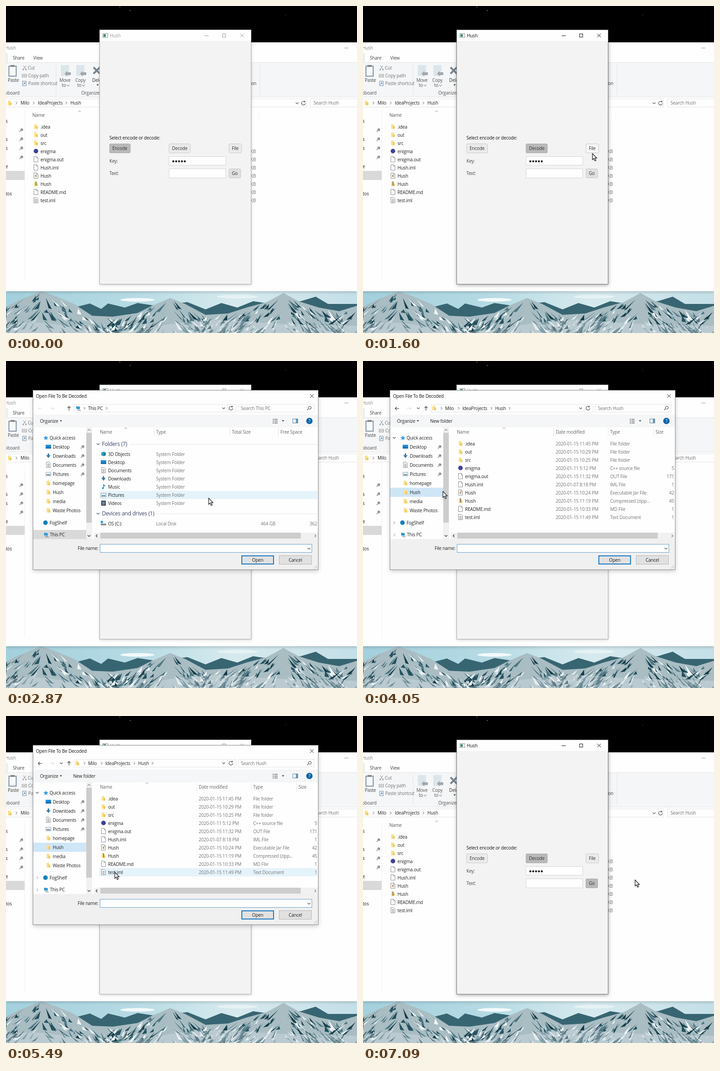
An HTML page for the animation above (7.17 s loop, 774x720 px).

```html
<!DOCTYPE html>
<html lang="en">
<head>
<meta charset="utf-8">
<title>File picker demo</title>
<style>
html, body { margin: 0; width: 100%; height: 100%; overflow: hidden; background: #000; }
svg { display: block; width: 774px; height: 720px; }
text { font: 10px "Open Sans", "Noto Sans", sans-serif; letter-spacing: -.02em; white-space: pre; }
text.big { font-size: 12px; }
.line { fill: none; }
.shade { filter: drop-shadow(0 2px 3px #0003); }
.glow { filter: drop-shadow(0 3px 5px #0003); }
#cursor { animation: move 7170ms linear infinite; }
</style>
</head>
<body>
<svg id="stage" viewBox="0 0 774 720"></svg>
<script>
const LOOP = 7170;
const WHITE = '#fefefe', PANEL = '#f3f3f3', INK = '#222', GREY = '#747474',
      EDGE = '#e4e4e4', THUMB = '#cdcdcd', BLUE = '#1e90d2';

// Drawing helpers
const text = (x, y, s, fill = INK, more = '') => `<text x="${x}" y="${y}" fill="${fill}" ${more}>${s}</text>`;
const end = (x, y, s, fill = GREY) => text(x, y, s, fill, 'text-anchor="end"');
const mid = (x, y, s, fill = INK) => text(x, y, s, fill, 'text-anchor="middle"');
const rect = (x, y, w, h, fill, more = '') => `<rect x="${x}" y="${y}" width="${w}" height="${h}" fill="${fill}" ${more}/>`;
const box = (x, y, w, h, fill, stroke, more = '') => rect(x + .5, y + .5, w - 1, h - 1, fill, `stroke="${stroke}" ${more}`);
const line = (d, stroke = GREY, w = 1) => `<path class="line" d="${d}" stroke="${stroke}" stroke-width="${w}"/>`;
const shape = (d, fill, more = '') => `<path d="${d}" fill="${fill}" ${more}/>`;
const dot = (x, y, r, fill) => `<circle cx="${x}" cy="${y}" r="${r}" fill="${fill}"/>`;
const group = (id, ...parts) => `<g id="${id}">${parts.join('')}</g>`;
const chevron = {
  right: (x, y, c = '#555') => line(`M${x - 1.5} ${y - 3}l3 3-3 3`, c),
  left: (x, y, c = '#333') => line(`M${x + 1.5} ${y - 3}l-3 3 3 3`, c, 1.3),
  down: (x, y, c = '#555') => line(`M${x - 3} ${y - 1.5}l3 3 3-3`, c, 1.2),
  up: (x, y, c = '#888') => line(`M${x - 3} ${y + 1.5}l3-3 3 3`, c)
};
const caret = (x, y) => shape(`M${x - 2.5} ${y - 1.5}h5l-2.5 3z`, '#333');
const pin = (x, y) => line(`M${x - 4} ${y + 4}l3-3m-1.5-2.5l4 4m-2.5-5.5l4.5 4.5`, '#77808a', 1.2)
  + shape(`M${x - 1} ${y - 2}l2-2 3 3-2 2z`, '#77808a');
const cross = (x, y, r = 4, c = INK, w = 1) => line(`M${x - r} ${y - r}l${2 * r} ${2 * r}m0 ${-2 * r}l${-2 * r} ${2 * r}`, c, w);
const refresh = (x, y) => line(`M${x + 3} ${y - 3}a4.2 4.2 0 1 0 1.2 3m-1-5.5v2.8h-2.8`, '#555', 1.2);

const page = (x, y, rows = 0) => shape(`M${x - 4.5} ${y - 6}h6l3 3v9h-9z`, '#fdfdfd', 'stroke="#8f8f8f"')
  + (rows ? line(`M${x - 2.5} ${y - 2}h5m-5 2h5m-5 2h5m-5 2h5`, '#8b959a') : line(`M${x + 1.5} ${y - 6}v3h3`, '#8f8f8f'));
const icons = {
  folder: (x, y) => rect(x - 4, y - 5, 6, 10, '#fbe08b') + rect(x, y - 1, 4, 6, '#efc95a'),
  page: (x, y) => page(x, y),
  lines: (x, y) => page(x, y, 4),
  code: (x, y) => dot(x, y, 5, '#3d4298'),
  jar: (x, y) => page(x, y) + rect(x - 2, y - 2, 4, 5, '#c4a27c'),
  zip: (x, y) => icons.folder(x, y) + line(`M${x} ${y - 5}v9`, '#7c7458', 2),
  star: (x, y) => shape(`M${x} ${y - 5}l1.5 3.5 4 .3-3 2.5 1 4-3.500-2.200-3.500 2.200 1-4-3-2.500 4-.3z`, '#3999dc'),
  screen: (x, y) => rect(x - 6, y - 4, 12, 8, '#1789d0') + rect(x - 6, y + 2, 12, 2, '#125a90'),
  down: (x, y) => shape(`M${x - 1.5} ${y - 5}h3v4h3.5l-5 6-5-6h3.5z`, '#3578a8'),
  photo: (x, y) => box(x - 6, y - 4, 12, 9, '#e9f3f8', '#9aa0a4') + rect(x - 4, y + 1, 8, 2, '#447f98'),
  cube: (x, y) => shape(`M${x - 5} ${y - 3}l5-2 5 2v6l-5 2-5-2z`, '#22a7bc') + shape(`M${x} ${y - 1}l5-2v6l-5 2z`, '#17778f'),
  note: (x, y) => line(`M${x} ${y + 3}v-8q1 3 4 4`, BLUE, 1.6) + dot(x - 1.5, y + 3.5, 2, BLUE),
  film: (x, y) => rect(x - 5, y - 5, 10, 11, '#3c4044') + rect(x - 3, y - 3, 6, 7, '#6a86a0'),
  cloud: (x, y) => dot(x, y, 5, '#117fc0'),
  pc: (x, y) => shape(`M${x - 5} ${y - 4}l8 1v6l-8-1z`, '#3199d0') + line(`M${x - 3} ${y + 4.5}l8 1`, '#555'),
  disk: (x, y) => rect(x - 6, y + 1, 12, 4, '#8f9296') + rect(x - 6, y - 5, 5, 5, '#2aa0d8')
};

const FILES = [
  ['folder', '.idea', '15 11:45', 'File folder'],
  ['folder', 'out', '15 10:29', 'File folder'],
  ['folder', 'src', '15 10:25', 'File folder'],
  ['code', 'enigma', '11 5:12', 'C++ source file', 5],
  ['page', 'enigma.out', '15 11:32', 'OUT File', 171],
  ['page', 'Hush.iml', '07 8:18', 'IML File', 1],
  ['jar', 'Hush', '15 10:24', 'Executable Jar File', 42],
  ['zip', 'Hush', '15 11:19', 'Compressed (zipp...', 45],
  ['page', 'README.md', '15 10:33', 'MD File', 1],
  ['lines', 'test.iml', '15 11:49', 'Text Document', 1]
];

function wallpaper() {
  const ridge = [[0, 662], [28, 648], [78, 628], [112, 640], [150, 656], [190, 682], [235, 684], [290, 676], [322, 660],
    [362, 643], [395, 656], [440, 680], [490, 677], [530, 664], [575, 652], [612, 632], [645, 650], [690, 664], [735, 672], [774, 660]];
  const far = [[150, 664], [185, 655], [210, 667], [225, 655], [262, 664], [290, 654], [330, 660], [400, 652], [440, 668],
    [475, 654], [510, 664], [545, 650], [585, 656], [650, 650], [683, 640], [710, 656], [774, 656]];
  const area = pts => 'M' + pts.map(p => p.join(' ')).join('L') + 'V720H' + pts[0][0] + 'z';
  const tones = ['#173c49', '#24525f', '#4d7783', '#a5bcc3', '#f0f4f5'];
  let seed = 7;
  const rnd = () => (seed = seed * 16807 % 2147483647) / 2147483647;
  let s = rect(0, 628, 774, 92, 'url(#sky)')
    + '<ellipse cx="290" cy="647" rx="38" ry="4" fill="#f3f9fa"/><ellipse cx="510" cy="640" rx="45" ry="4" fill="#e6f2f5"/>'
    + shape(area(far), '#386572') + shape(area(ridge), '#a9bdc3');
  for (let i = 0; i < 520; i++) {
    const x = rnd() * 774;
    const k = Math.max(1, ridge.findIndex(p => p[0] >= x));
    const [a, b] = [ridge[k - 1], ridge[k]];
    const top = a[1] + (b[1] - a[1]) * (x - a[0]) / (b[0] - a[0]);
    const y = top + 1 + rnd() * (714 - top);
    const side = b[1] > a[1] ? 1 : -1;
    const len = 7 + rnd() * 18, run = side * len * (.5 + rnd()), w = 4 + rnd() * 7;
    s += shape(`M${x.toFixed(1)} ${y.toFixed(1)}l${run.toFixed(1)} ${len.toFixed(1)}l${(-side * w).toFixed(1)} -2z`, tones[i % 5]);
  }
  return s + shape('M0 700Q70 690 150 708T330 706T520 694T774 704V720H0z', '#d5e0e360');
}

function explorer() {
  let s = rect(0, 80, 774, 548, WHITE, 'class="shade"')
    + text(-2, 96, 'Hush', '#8a8a8a') + line('M746 92.5h9', '#999')
    + rect(0, 104, 4, 20, '#e9eef3') + text(15, 118, 'Share', '#444') + text(60, 118, 'View', '#444')
    + rect(0, 124, 774, 76, '#f5f6f7') + line('M0 124.5H774M0 200.5H774M110.5 128V196M559.5 128V196', EDGE);
  s += box(6, 132, 17, 23, '#f6f9fb', '#7c8f9f', 'stroke-width="2"') + rect(10, 130, 9, 4, '#858585') + text(4, 167, 'Paste', '#444')
    + line('M38 131l6 8m0-8l-6 8', '#8a9298') + dot(38, 140, 1.7, '#a0a8aa') + dot(44, 140, 1.7, '#a0a8aa') + text(48, 139.5, 'Cut', GREY)
    + box(35, 150, 11, 7, '#eef0f2', '#999') + line('M37 153.5h7', '#888') + text(49, 157, 'Copy path', GREY)
    + box(36, 165, 9, 11, '#eef3f8', '#7b91a8') + line('M38 173l4-4m-3 0h3v3', '#4675a0') + text(49, 174, 'Paste shortcut', GREY);
  for (const [x, name] of [[121, 'Move'], [155, 'Copy']])
    s += rect(x, 130, 18, 24, '#dbe6ea') + shape(`M${x + 8} 149l6-6v3h8v6h-8v3z`, '#a2a8ae')
      + mid(x + 9, 167, name, '#555') + text(x + 2, 178, 'to', '#555') + chevron.down(x + 16, 175, '#999');
  s += cross(200, 142, 7, '#77838e', 4) + text(190, 167, 'Delete', '#333') + caret(202, 174)
    + end(30, 195, 'Clipboard', '#555') + text(166, 195, 'Organize', '#555') + end(552, 174, 'Invert selection', '#444');
  s += box(-2, 204, 665, 19, WHITE, EDGE) + box(671, 204, 110, 19, WHITE, EDGE) + icons.folder(8, 213.5)
    + chevron.right(23, 213.5) + text(32, 217, 'Milo') + chevron.right(61, 213.5) + text(70, 217, 'IdeaProjects')
    + chevron.right(133, 213.5) + text(142, 217, 'Hush') + chevron.down(642, 214) + refresh(656, 214) + text(678, 217, 'Search Hush', GREY);
  s += text(58, 244, 'Name', '#555') + chevron.up(162, 232) + line('M41.5 230V608M557.5 234V250', '#f0f0f0')
    + rect(0, 363, 41, 20, '#d9d9d9');
  for (const [y, t] of [[257, 's'], [297, 's'], [317, 's'], [357, 'e'], [417, 'tos']]) s += text(-1, y, t);
  for (let y = 273; y < 340; y += 20) s += pin(34, y);
  FILES.forEach(([icon, name, , , size], i) => {
    const y = 266 + 18 * i;
    s += icons[icon](66, y - .5) + text(76, y + 3.5, name) + (size ? end(551, y + 3.5, 'KB') : '');
  });
  return s;
}

const button = (x, y, w, label, fill = '#ebebeb', edge = '#c9c9c9') =>
  box(x, y, w, 21, fill, edge, 'rx="2"') + mid(x + w / 2, y + 14, label, '#333');
const DOWN = ['#b9b9b9', '#adadad'];

function hush() {
  const frame = c => text(229, 69, 'Hush', c) + line('M438 65.5h9', c) + box(477, 61, 8, 8, 'none', c) + cross(520.5, 65, 4, c);
  let s = rect(207, 53, 334, 559, PANEL, 'class="shade"')
    + group('active', rect(207, 53, 334, 559, PANEL, 'class="glow"'))
    + rect(207, 53, 334, 24, WHITE) + box(206, 52, 335, 561, 'none', '#aaa')
    + box(213, 60, 12, 10, '#f4f4f4', '#999') + rect(215, 62, 5, 6, '#3c8f6c') + frame('#999')
    + group('activeTitle', rect(228, 56, 310, 18, WHITE), frame('#111'), box(206, 52, 335, 561, 'none', '#777'))
    + text(228, 294, 'Select encode or decode:', '#111') + text(228, 345, 'Key:', '#444') + text(228, 372, 'Text:', '#444')
    + box(359, 331, 126, 20, WHITE, '#d5d5d5') + box(359, 358, 126, 21, WHITE, '#d5d5d5');
  for (let i = 0; i < 5; i++) s += dot(369 + i * 6.3, 342, 2.3, '#222');
  return s + button(228, 303, 47, 'Encode') + button(359, 303, 48, 'Decode') + button(491, 303, 29, 'File') + button(491, 358, 27, 'Go', '#e0e0e0')
    + group('encodeDown', button(228, 303, 46, 'Encode', ...DOWN))
    + group('decodeDown', button(359, 303, 48, 'Decode', ...DOWN))
    + group('fileHover', button(491, 303, 29, 'File', '#f6f6f6'))
    + group('fileDown', button(491, 303, 29, 'File', ...DOWN))
    + group('goDown', button(491, 358, 27, 'Go', ...DOWN));
}

const hover = (id, y) => group(id, rect(206, y, 481, 18, '#e5f3fb'));

function drives() {
  const head = [['Name', 207], ['Type', 331], ['Total Size', 498], ['Free Space', 605]];
  const rows = [['cube', '3D Objects'], ['screen', 'Desktop'], ['lines', 'Documents'], ['down', 'Downloads'],
    ['note', 'Music'], ['photo', 'Pictures'], ['film', 'Videos']];
  let s = hover('overPictures', 286) + hover('overVideos', 304) + chevron.up(264, 148)
    + line('M326.5 147V166M493.5 147V166M600.5 147V166M273 183.5H686M332 336.5H686', EDGE);
  for (const [t, x] of head) s += text(x, 160, t, '#666');
  for (const [y, t] of [[183, 'Folders (7)'], [336, 'Devices and drives (1)']])
    s += chevron.down(203, y) + text(211.5, y + 4, t, '#3b4465', 'class="big"');
  rows.forEach(([icon, name], i) => {
    const y = 205 + 18 * i;
    s += icons[icon](215, y - .5) + text(225, y + 3.5, name) + text(331, y + 3.5, 'System Folder', GREY);
  });
  return group('drives', s, icons.disk(215, 357), text(225, 361.5, 'OS (C:)'), text(331, 361.5, 'Local Disk', GREY),
    end(594, 361.5, '464 GB'), end(686, 361.5, '362'),
    rect(60, 372, 117, 20, '#d9d9d9'), icons.pc(89, 382), text(97, 386, 'This PC'),
    icons.pc(160, 103.5), chevron.right(173, 104), text(181, 107.5, 'This PC'), chevron.right(222, 104),
    line('M79 104.5h-8m3-3l-3 3 3 3', '#ddd'));
}

function folder() {
  let s = hover('overJar', 281) + hover('overZip', 299) + hover('overReadme', 317) + hover('overTest', 335)
    + chevron.up(311, 148) + line('M420.5 147V166M540.5 147V166M640.5 147V166', EDGE);
  for (const [t, x] of [['Name', 207], ['Date modified', 425], ['Type', 545], ['Size', 645]]) s += text(x, 160, t, '#666');
  FILES.forEach(([icon, name, date, type, size = ''], i) => {
    const y = 182 + 18 * i;
    s += icons[icon](215, y - .5) + text(225, y + 3.5, name) + text(425, y + 3.5, `2020-01-${date} PM`, GREY)
      + text(545, y + 3.5, type, GREY) + end(686, y + 3.5, size);
  });
  return group('folder', s, icons.folder(157, 103.5), chevron.right(173, 104), text(181, 107.5, 'Milo'), chevron.right(211, 104),
    text(219, 107.5, 'IdeaProjects'), chevron.right(283, 104), text(291.5, 107.5, 'Hush'), chevron.right(323, 104),
    text(148, 136, 'New folder'), line('M80 104.5h-9m3.5-3.5l-3.5 3.5 3.5 3.5', '#444', 1.2), chevron.down(122, 104),
    icons.pc(89, 382), text(97, 386, 'This PC'));
}

function sidebar() {
  const items = [['screen', 'Desktop'], ['down', 'Downloads'], ['lines', 'Documents'], ['photo', 'Pictures'],
    ['folder', 'homepage'], ['folder', 'Hush'], ['folder', 'media'], ['folder', 'Waste Photos']];
  let s = group('sideHover', rect(60, 279, 117, 20, '#cfe6f7'), chevron.down(69, 169), chevron.right(69, 356, '#888'), chevron.right(69, 383, '#888'))
    + icons.star(88, 169) + text(96, 172.5, 'Quick access') + icons.cloud(87, 356) + text(96, 359.5, 'FogShelf');
  items.forEach(([icon, name], i) => {
    const y = 189 + 20 * i;
    s += icons[icon](93.5, y - .5) + text(103, y + 3.5, name) + (i < 4 ? pin(169, y) : '');
  });
  return s + rect(177, 146, 13, 246, '#f1f1f1') + rect(177, 158, 12, 198, THUMB)
    + chevron.up(183, 152, '#333') + chevron.down(183, 385, '#333');
}

function dialog() {
  return group('dialog',
    rect(60, 65, 629, 395, PANEL, 'class="glow"'), rect(60, 65, 629, 53, WHITE), rect(60, 118, 629, 28, '#f5f6f7'),
    rect(60, 146, 629, 246, WHITE), text(66, 81, 'Open File To Be Decoded', '#111'), cross(674.5, 77, 4),
    line('M97 104.5h9m-3.5-3.5l3.5 3.5-3.5 3.5', '#d8d8d8'), line('M139 109v-9m-3.5 3.5l3.5-3.5 3.5 3.5', '#444', 1.2),
    box(150, 95, 358, 18, WHITE, EDGE), line('M488.5 95V113', EDGE), chevron.down(480, 104), refresh(496, 104),
    box(512, 95, 168, 18, WHITE, EDGE),
    line('M664 108l3.5-3.5a3 3 0 1 1 1 1', '#555', 1.2),
    text(75, 136, 'Organize'), caret(121, 132),
    line('M588 128.5h3m1 0h7M588 132.5h3m1 0h7M588 136.5h3m1 0h7', '#888', 2), caret(611, 132),
    box(632, 127, 12, 10, '#f8fbfd', '#66798f'), rect(639, 128, 4, 8, '#5aa2d0'),
    dot(669, 132, 7, '#0b67a8'), mid(669, 136, '?', '#fff'),
    sidebar(), drives(), folder(),
    group('searchPc', text(518, 107.5, 'Search This PC', GREY)), group('searchHush', text(518, 107.5, 'Search Hush', GREY)),
    rect(194, 378, 494, 14, '#f1f1f1'), rect(208, 378, 442, 13, THUMB), chevron.left(200, 385), chevron.right(682, 385, '#333'),
    rect(60, 392, 629, 68, '#f0f0f0'), text(158, 416, 'File name:'), box(207, 403, 468, 19, WHITE, '#6aa0c8'), chevron.down(668, 413),
    rect(520, 429, 70, 18, '#e1e1e1', 'stroke="#1878c4" stroke-width="2"'), mid(555, 441.5, 'Open'),
    box(602, 428, 72, 20, '#e1e1e1', '#b4b4b4'), mid(638, 441.5, 'Cancel'),
    line('M679 457l7-7m-3 7l3-3', '#b3b3b3'), box(59, 64, 630, 396, 'none', '#8a8a8a'));
}

const arrow = '<path id="cursor" d="M0 0V13.5L3.2 10.7 5.3 16 7.7 15 5.5 9.9H9.6z" fill="#fff" stroke="#111" stroke-width="1.2"/>';

document.getElementById('stage').innerHTML =
  '<defs><linearGradient id="sky"><stop stop-color="#a3d0dd"/><stop offset=".35" stop-color="#b5dae4"/><stop offset=".65" stop-color="#d6eaee"/><stop offset="1" stop-color="#c4dfe8"/></linearGradient></defs>'
  + rect(0, 0, 774, 80, '#000') + rect(250, 1, 2, 2, '#555') + rect(273, 9, 2, 2, '#666') + rect(616, 19, 1, 2, '#444')
  + wallpaper() + explorer() + hush() + dialog() + arrow;

// Timeline: each part is visible during its spans, in ms
const DECODE = 1050, OPEN = 2300, SIDE = 3190, ENTER = 3800, CLOSE = 5500, GO = 6300;
const focus = [[DECODE, OPEN], [CLOSE, LOOP]];
const spans = {
  cursor: [[200, LOOP]], active: focus, activeTitle: focus,
  encodeDown: [[0, DECODE]], decodeDown: [[DECODE, LOOP]],
  fileHover: [[1560, 1850]], fileDown: [[1850, GO]], goDown: [[GO, LOOP]],
  dialog: [[OPEN, CLOSE]], drives: [[OPEN, ENTER]], searchPc: [[OPEN, ENTER]],
  folder: [[ENTER, CLOSE]], searchHush: [[ENTER, CLOSE]], sideHover: [[SIDE, CLOSE]],
  overVideos: [[2700, 2850]], overPictures: [[2850, SIDE]],
  overJar: [[4205, 4430]], overZip: [[4430, 4953]], overReadme: [[4953, 5038]], overTest: [[5038, CLOSE]]
};

// Pointer stops: time, x, y and the easing that leads on to the next stop
const path = [
  [0, 716, 722], [250, 716, 722, 'ease-in-out'], [950, 384, 315], [1150, 384, 315, 'ease-in-out'],
  [1600, 506, 325], [2650, 506, 324, 'ease-in'], [2870, 448, 302, 'ease-out'], [3400, 118, 290],
  [3850, 118, 290, 'ease-in'], [4050, 176, 287, 'ease-out'], [4650, 251, 302], [4810, 251, 302, 'ease-in-out'],
  [5150, 240, 344], [5600, 240, 344, 'ease-in'], [5950, 432, 353, 'ease-out'], [6200, 504, 369],
  [6500, 504, 369, 'ease-in-out'], [7090, 600, 361], [LOOP, 600, 361]
];

const at = ms => (ms / LOOP * 100).toFixed(4) + '%';
let css = '@keyframes move{' + path.map(([ms, x, y, ease = 'linear']) =>
  `${at(ms)}{transform:translate(${x}px,${y}px);animation-timing-function:${ease}}`).join('') + '}';
for (const [id, list] of Object.entries(spans)) {
  css += `@keyframes ${id}{0%{opacity:0}${list.map(([a, b]) => `${at(a)}{opacity:1}${at(b)}{opacity:0}`).join('')}}`;
  if (id !== 'cursor') css += `#${id}{animation:${id} ${LOOP}ms step-end infinite}`;
}
css += `#cursor{animation:move ${LOOP}ms infinite,cursor ${LOOP}ms step-end infinite}`;
document.head.appendChild(document.createElement('style')).textContent = css;
</script>
</body>
</html>
```
